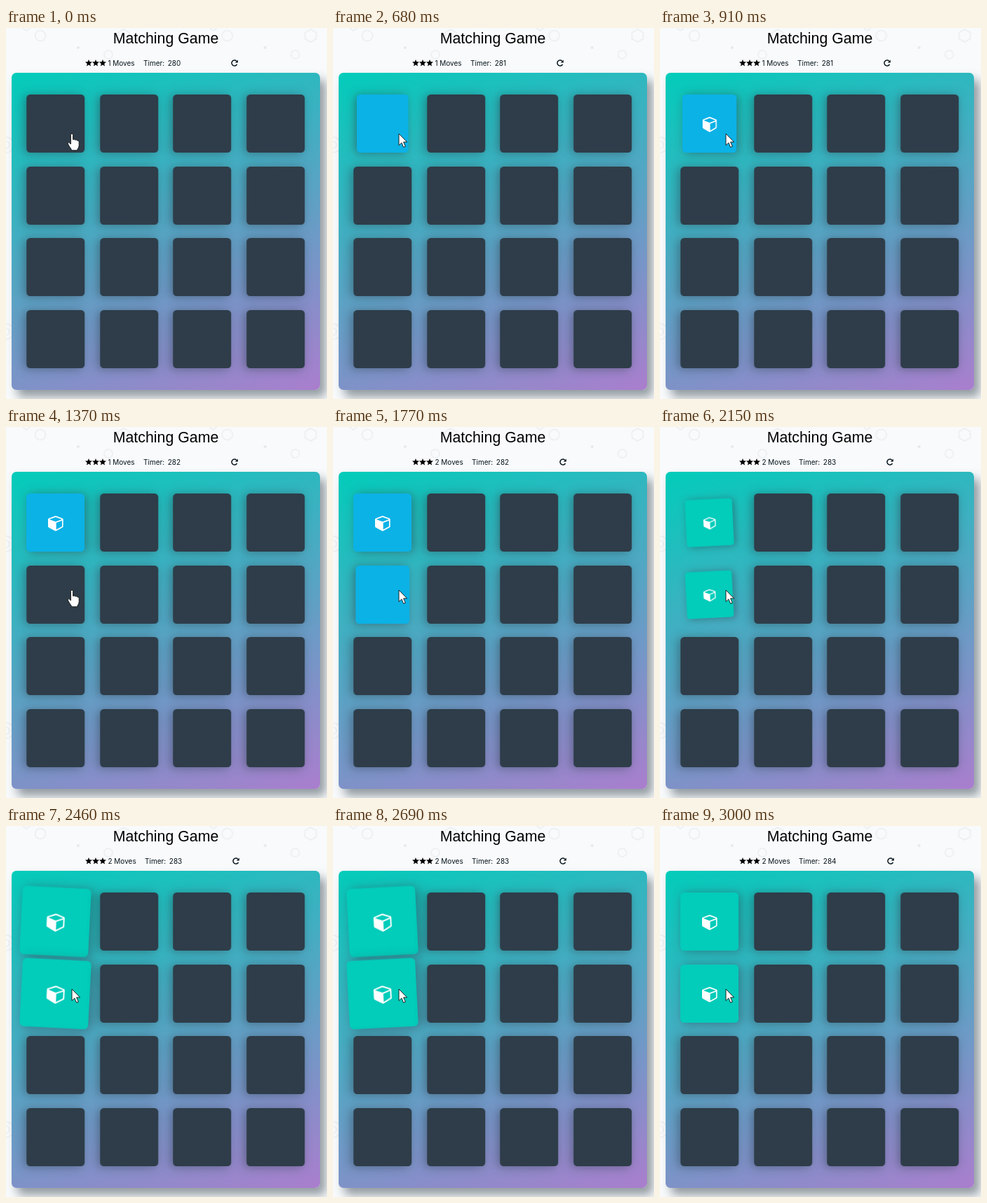
Write an HTML page that moves like this. It is 458 by 530 pixels and loops after 3780 ms.

```html
<!DOCTYPE html>
<html lang="en">
<head>
<meta charset="utf-8">
<title>Matching Game</title>
<style>
  html, body { margin: 0; width: 100%; height: 100%; overflow: hidden; }
  body { position: relative; background: #f8fafb; color: #000; --t: 0ms; }
  svg { display: block; overflow: visible; }
  .back { position: absolute; inset: 0; width: 458px; height: 530px; overflow: hidden; }
  h1 {
    position: absolute; left: 0; top: 2.7px; width: 456px; margin: 0;
    font: 21.33px/24px "Liberation Sans", Arial, sans-serif; text-align: center;
  }
  .panel {
    position: absolute; left: 113px; top: 44.2px; display: flex; white-space: pre;
    font: 10px/12px Inter, sans-serif; color: #06131c;
  }
  .panel svg { height: 10px; margin-top: .8px; }
  #moves { margin: 0 12.4px 0 2.4px; }
  #timer { margin: 0 72px 0 4.6px; }
  .deck {
    position: absolute; left: 8px; top: 64px; width: 440px; height: 453.3px; border-radius: 6.7px;
    background: linear-gradient(160deg, #02ccba 0%, #aa7ecd 100%);
    box-shadow: 8px 10px 13.3px rgba(46, 61, 73, .5);
  }
  .card {
    position: absolute; width: 83.3px; height: 83.3px; border-radius: 5.3px;
    left: calc(21px + 104.67px * var(--col)); top: calc(31px + 102.67px * var(--row));
    background: #2e3d49; box-shadow: 3.3px 1.3px 13.3px rgba(46, 61, 73, .5);
    transform: rotateY(180deg);
  }
  .card svg { position: absolute; left: 30.6px; top: 32px; width: 21.6px; height: 21.6px; fill: #fff; opacity: 0; }
  .pair {
    animation: flip 500ms ease calc(var(--open) - var(--t)) forwards paused,
               tada 750ms ease calc(var(--match) - var(--t)) forwards paused;
  }
  .pair svg { animation: show 1ms calc(var(--open) + 140ms - var(--t)) forwards paused; }
  @keyframes flip {
    from { transform: rotateY(180deg); background: #0bb2e6; }
    to { transform: rotateY(0deg); background: #0bb2e6; }
  }
  @keyframes show { to { opacity: 1; } }
  @keyframes tada {
    0% { transform: scale(1) rotate(0deg); background: #02ccba; }
    10%, 20% { transform: scale(.8) rotate(-3deg); }
    30%, 50%, 70%, 90% { transform: scale(1.18) rotate(3deg); }
    40%, 60%, 80% { transform: scale(1.18) rotate(-3deg); }
    100% { transform: scale(1) rotate(0deg); background: #02ccba; }
  }
  #cursor { position: absolute; left: 0; top: 0; width: 1px; height: 1px; }
  #cursor path { fill: #fff; stroke: #111; stroke-width: .9; stroke-linejoin: round; }
</style>
</head>
<body>
<svg class="back">
  <defs>
    <pattern id="tile" width="266.7" height="266.7" patternUnits="userSpaceOnUse">
      <g fill="none" stroke="#eceef0" stroke-width="1.6">
        <circle cx="49" cy="11" r="7.5"/>
        <circle cx="146" cy="38" r="6"/>
        <path d="M168 2l8 4.500v9l-8 4.500-8-4.500v-9z"/>
        <path d="M24 0l5 4 5-4"/>
        <circle cx="0" cy="167" r="11"/>
        <circle cx="0" cy="167" r="5"/>
        <path d="M262 208l-10 5v10l10 5"/>
      </g>
      <circle cx="103" cy="28" r="2" fill="#e6e8ea"/>
    </pattern>
  </defs>
  <rect width="458" height="530" fill="url(#tile)"/>
</svg>

<h1>Matching Game</h1>
<div class="panel">
  <svg id="stars" width="30" viewBox="0 0 30 10"></svg>
  <span id="moves"></span><span>Timer:</span><span id="timer"></span>
  <svg width="10" viewBox="0 0 10 10">
    <path d="M8.600 6.800A4 4 0 1 1 7.900 2.300" fill="none" stroke="#06131c" stroke-width="1.500"/>
    <path d="M9.900 .4v4.100H5.800z" fill="#06131c"/>
  </svg>
</div>
<div class="deck" id="deck"></div>
<svg id="cursor">
  <path id="arrow" d="M0 0V16.500l3.900-3.600 2.700 6.400 2.700-1.100-2.700-6.300h5z"/>
  <path id="hand" d="M-1.600 1.600a1.600 1.600 0 0 1 3.200 0V8.400q2-1 3.200.6 2-.8 3 .9 2.200-.4 2.400 1.800V17q-.3 3.500-2.200 5v1.800H-.8v-1.600q-2.500-3-4.600-7.200-.9-2 .6-2.400 1.400-.2 3.200 2.400z"/>
</svg>

<script>
  const LOOP = 3780;
  const TICKS = [0, 70, 680, 760, 840, 910, 990, 1060, 1140, 1220, 1290, 1370,
    1770, 1850, 1920, 2000, 2080, 2150, 2230, 2310, 2390, 2460, 2540, 2620, 2690, 2770, 2850, 3000];
  const SECONDS = [70, 1060, 2080, 3000];
  const CLICKS = [680, 1770];
  const PATH = [[0, 151], [1060, 163], [1140, 177], [1220, 204], [1290, 223], [1370, 233]];
  const PAIR = [{ open: 613, match: 2097 }, { open: 1711, match: 2089 }];
  const CUBE = "M896 1629l640-349v-636l-640 233v752zM832 765l698-254-698-254-698 254z" +
    "M1664 512v768q0 35-18 65t-49 47l-704 384q-28 16-61 16t-61-16l-704-384q-31-17-49-47t-18-65v-768" +
    "q0-40 23-73t61-47l704-256q22-8 44-8t44 8l704 256q38 14 61 47t23 73z";

  const $ = id => document.getElementById(id);
  const lastOf = (list, t, at = v => v) => list.filter(v => at(v) <= t).pop();

  function star(cx) {
    const points = Array.from({ length: 10 }, (_, i) => {
      const a = Math.PI * (i / 5 - .5), r = i % 2 ? 2.3 : 5.2;
      return `${cx + r * Math.cos(a)},${5.2 + r * Math.sin(a)}`;
    });
    return `<polygon points="${points.join(" ")}"/>`;
  }
  $("stars").innerHTML = [5, 15, 25].map(star).join("");

  for (let i = 0; i < 16; i++) {
    const card = document.createElement("div");
    const col = i % 4, row = Math.floor(i / 4);
    card.className = "card";
    card.style.setProperty("--col", col);
    card.style.setProperty("--row", row);
    if (col === 0 && PAIR[row]) {
      card.classList.add("pair");
      card.style.setProperty("--open", PAIR[row].open + "ms");
      card.style.setProperty("--match", PAIR[row].match + "ms");
      card.innerHTML = `<svg viewBox="0 128 1664 1664"><path fill-rule="evenodd" d="${CUBE}"/></svg>`;
    }
    $("deck").append(card);
  }

  function draw(t) {
    document.body.style.setProperty("--t", t + "ms");
    $("moves").textContent = (t < CLICKS[1] ? 1 : 2) + " Moves";
    $("timer").textContent = 280 + SECONDS.filter(s => s <= t).length;
    const y = lastOf(PATH, t, p => p[0])[1];
    const pointing = t < CLICKS[0] || (t >= 1220 && t < CLICKS[1]);
    $("cursor").style.transform = `translate(94px, ${y}px)`;
    $("hand").style.display = pointing ? "" : "none";
    $("arrow").style.display = pointing ? "none" : "";
  }

  const start = performance.now();
  let shown = -1;
  function frame() {
    const t = lastOf(TICKS, (performance.now() - start) % LOOP);
    if (t !== shown) draw(shown = t);
    requestAnimationFrame(frame);
  }
  frame();
</script>
</body>
</html>
```
